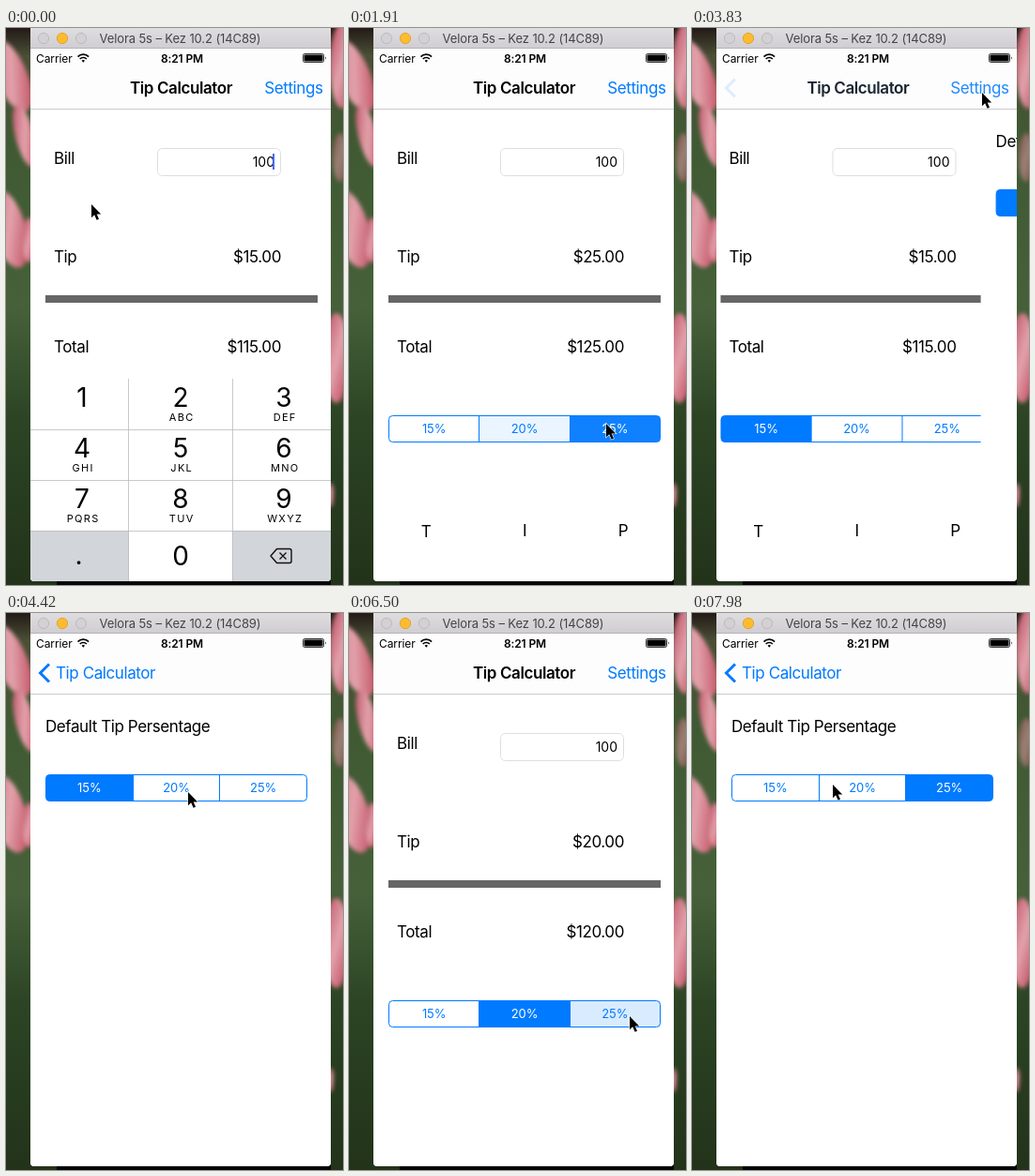
Write an HTML page that moves like this. It is 359 px wide and 594 px high and loops after 8000 ms.

```html
<!DOCTYPE html>
<html lang="en">
<head>
<meta charset="utf-8">
<title>Tip Calculator</title>
<style>
html, body { margin: 0; width: 100%; height: 100%; overflow: hidden; background: #26391f; }
svg { display: block; width: 359px; height: 594px; }
text { font: 17px Inter, "Liberation Sans", sans-serif; letter-spacing: -.41px; white-space: pre; }
.bold { font-weight: 600; }
.blue { fill: #007aff; }
.mid { text-anchor: middle; }
.end { text-anchor: end; }
.status { font-size: 12px; letter-spacing: -.1px; }
.seg text { font-size: 13px; letter-spacing: -.08px; text-anchor: middle; }
.digit { font-size: 28px; letter-spacing: 0; text-anchor: middle; }
.letters { font-size: 11px; letter-spacing: 1.3px; text-anchor: middle; }
</style>
</head>
<body>
<svg viewBox="0 0 359 594" xmlns="http://www.w3.org/2000/svg">
  <defs>
    <linearGradient id="leaves" x2="0" y2="1">
      <stop offset="0" stop-color="#241a17"/><stop offset=".05" stop-color="#4a4f36"/>
      <stop offset=".2" stop-color="#3f5a33"/><stop offset=".5" stop-color="#46613a"/>
      <stop offset=".7" stop-color="#2c4424"/><stop offset="1" stop-color="#22331a"/>
    </linearGradient>
    <linearGradient id="petal" x2="1" y2="1">
      <stop offset="0" stop-color="#b8475c"/><stop offset=".5" stop-color="#e3a3ac"/>
      <stop offset="1" stop-color="#b93a50"/>
    </linearGradient>
    <linearGradient id="chrome" x2="0" y2="1">
      <stop offset="0" stop-color="#dfdde0"/><stop offset="1" stop-color="#cfcdd1"/>
    </linearGradient>
    <filter id="soft" x="-30%" y="-30%" width="160%" height="160%"><feGaussianBlur stdDeviation="2"/></filter>
    <clipPath id="screen"><path d="M26 22H346V586a4 4 0 0 1-4 4H30a4 4 0 0 1-4-4Z"/></clipPath>
    <clipPath id="body"><path d="M26 87H346V586a4 4 0 0 1-4 4H30a4 4 0 0 1-4-4Z"/></clipPath>
  </defs>

  <rect width="359" height="594" fill="url(#leaves)"/>
  <g filter="url(#soft)" fill="url(#petal)">
    <ellipse cx="5" cy="50" rx="17" ry="42" transform="rotate(-24 5 50)"/>
    <ellipse cx="20" cy="115" rx="10" ry="34" transform="rotate(-14 20 115)"/>
    <ellipse cx="3" cy="214" rx="18" ry="43" transform="rotate(-16 3 214)"/>
    <ellipse cx="25" cy="226" rx="7" ry="24"/>
    <ellipse cx="358" cy="40" rx="13" ry="46"/>
    <ellipse cx="356" cy="138" rx="8" ry="26" opacity=".55"/>
    <ellipse cx="352" cy="352" rx="14" ry="48"/>
    <ellipse cx="346" cy="498" rx="3" ry="13"/>
  </g>
  <rect x="54" y="588" width="292" height="6" fill="#050505"/>

  <path d="M26 0H346V22H26Z" fill="url(#chrome)"/>
  <path d="M26 21.5H346" stroke="#b5b3b6"/>
  <g fill="#d3d1d4" stroke="#bcbabd">
    <circle cx="40" cy="11" r="5.6"/>
    <circle cx="60" cy="11" r="5.6" fill="#fdbc2f" stroke="#e3a32a"/>
    <circle cx="80" cy="11" r="5.6"/>
  </g>
  <text class="mid" x="185.5" y="16" fill="#444" style="font-size:13px;letter-spacing:-.1px">Velora 5s – Kez 10.2 (14C89)</text>

  <g clip-path="url(#screen)">
    <rect x="26" y="22" width="320" height="568" fill="#fff"/>
    <rect x="26" y="22" width="320" height="64" fill="#fdfdfd"/>
    <path d="M26 86.5H346" stroke="#cbcbcf"/>
    <text class="status" x="32" y="36.5">Carrier</text>
    <text class="status bold mid" x="187.5" y="36.5">8:21 PM</text>
    <g fill="none" stroke="#000" stroke-width="1.7">
      <path d="M76.5 30.6a8.2 8.2 0 0 1 11.6 0M78.7 33a5.1 5.1 0 0 1 7.2 0"/>
      <path d="M82.3 36.8l-1.7-2a2.4 2.4 0 0 1 3.4 0Z" fill="#000" stroke="none"/>
    </g>
    <rect x="316.5" y="27.5" width="22" height="9" rx="1.8" fill="#fff" stroke="#000" stroke-width=".8"/>
    <rect x="317.5" y="28.5" width="20" height="7" rx="1"/>
    <path d="M340 30.2q1.6 1.8 0 3.6Z"/>

    <text id="title" class="bold mid" y="70">Tip Calculator</text>
    <text id="settings" class="blue end" x="337.5" y="70">Settings</text>
    <g id="back">
      <path d="M46 54.5 36.5 64 46 73.5" fill="none" stroke="#007aff" stroke-width="3"/>
      <text id="backText" class="blue" y="70">Tip Calculator</text>
    </g>

    <g clip-path="url(#body)">
      <g id="main">
        <rect x="26" y="87" width="320" height="503" fill="#fff"/>
        <text x="51" y="145">Bill</text>
        <rect x="161.5" y="128.5" width="131" height="29" rx="5" fill="#fff" stroke="#dedede"/>
        <text class="end" x="286" y="148" style="font-size:14px;letter-spacing:0">100</text>
        <rect id="caret" x="284" y="134" width="2" height="17" fill="#4767ee"/>
        <text x="51" y="250">Tip</text>
        <text id="tip" class="end" x="293" y="250"></text>
        <rect x="42" y="285" width="290" height="8" fill="#666"/>
        <text x="51" y="346">Total</text>
        <text id="total" class="end" x="293" y="346"></text>
        <g id="mainSeg" class="seg"></g>
        <g id="labels" class="mid">
          <text x="82" y="543">T</text><text x="187" y="542">I</text><text x="292" y="542">P</text>
        </g>
        <g id="keys"></g>
      </g>
      <g id="prefs">
        <rect x="26" y="87" width="320" height="503" fill="#fff"/>
        <text x="42" y="127">Default Tip Persentage</text>
        <g id="prefSeg" class="seg"></g>
      </g>
    </g>
  </g>
  <path id="cursor" d="M0 0V14.2L3.2 11.3 5.6 16.8 8 15.8 5.700 10.400H10.200Z" fill="#000" stroke="#fff" stroke-width="1.2" paint-order="stroke"/>
</svg>
<script>
const LOOP = 8000, STEP = 147.6, LEAD = 12;
const RATES = [15, 20, 25], BLUE = '#007aff';
const $ = id => document.getElementById(id);

function add(parent, tag, attrs, content) {
  const el = document.createElementNS('http://www.w3.org/2000/svg', tag);
  for (const key in attrs) el.setAttribute(key, attrs[key]);
  if (content) el.textContent = content;
  return parent.appendChild(el);
}

// All tables start with the step number.
const path = [
  [0, 91, 188], [3, 91, 188], [4, 98, 225], [5, 125, 320], [6, 160, 415], [7, 167, 437],
  [8, 167, 437], [9, 178, 436], [10, 220, 431], [11, 260, 425], [12, 274, 422], [15, 274, 422],
  [16, 235, 422], [17, 180, 422], [18, 165, 422], [19, 98, 422], [20, 94, 421], [21, 98, 416],
  [22, 240, 180], [23, 322, 51], [24, 309, 69], [27, 309, 69], [28, 290, 95], [29, 235, 150],
  [30, 194, 191], [32, 191, 189], [33, 186, 183], [34, 172, 160], [35, 146, 120], [36, 120, 84],
  [37, 109, 70], [39, 109, 70], [40, 118, 82], [41, 170, 170], [42, 245, 320], [43, 295, 425],
  [44, 299, 430], [45, 299, 430], [46, 301, 420], [47, 310, 270], [48, 318, 130], [49, 322, 70],
  [51, 322, 70], [52, 290, 90], [53, 200, 150], [54, 150, 183]
];
const push = [
  [0, 0], [25, 0], [26, .12], [27, .7], [28, .95], [29, 1],
  [38, 1], [39, .85], [40, .28], [41, .05], [42, 0],
  [49, 0], [50, .12], [51, .7], [52, .95], [53, 1]
];
const keyboard = [[0, 0], [1, 28], [2, 150], [3, 216]];
const choices = [[0, 0], [8, 1], [13, 2], [18, 1], [21, 0], [32, 1], [45, 2]];

function at(table, step) {
  const i = table.findIndex(row => row[0] > step);
  if (i < 0) return table[table.length - 1].slice(1);
  const a = table[i - 1], b = table[i], f = (step - a[0]) / (b[0] - a[0]);
  return a.slice(1).map((v, j) => v + (b[j + 1] - v) * f);
}

function segments(group, x, y, width) {
  const w = width / 3, bottom = y + 28;
  const ends = [
    `M${x + w} ${y}V${bottom}H${x + 4}a4 4 0 0 1-4-4V${y + 4}a4 4 0 0 1 4-4Z`,
    `M${x + w} ${y}h${w}v28h${-w}Z`,
    `M${x + 2 * w} ${y}H${x + width - 4}a4 4 0 0 1 4 4v20a4 4 0 0 1-4 4H${x + 2 * w}Z`
  ];
  const fills = ends.map(d => add(group, 'path', { d, fill: BLUE }));
  add(group, 'rect', { x, y, width, height: 28, rx: 4, fill: 'none', stroke: BLUE });
  for (const n of [1, 2])
    add(group, 'path', { d: `M${Math.floor(x + n * w) + .5} ${y}v28`, stroke: BLUE });
  const texts = RATES.map((r, i) => add(group, 'text', { x: x + w * (i + .5), y: y + 18.6 }, r + '%'));
  return (alphas, selected) => alphas.forEach((alpha, i) => {
    fills[i].setAttribute('fill-opacity', alpha);
    texts[i].setAttribute('fill', i === selected ? '#fff' : BLUE);
  });
}

function buildKeys() {
  const g = $('keys'), centers = [81, 186, 296];
  const letters = ['', 'ABC', 'DEF', 'GHI', 'JKL', 'MNO', 'PQRS', 'TUV', 'WXYZ'];
  add(g, 'rect', { x: 26, y: 374, width: 320, height: 216, fill: '#fff' });
  for (const x of [26, 241])
    add(g, 'rect', { x, y: 536, width: 105, height: 54, fill: '#d2d5da' });
  add(g, 'path', { d: 'M26 428.500H346M26 482.500H346M26 536.500H346M130.500 374V590M241.500 374V590', stroke: '#b9bbbf', 'stroke-width': .8 });
  letters.forEach((word, i) => {
    const x = centers[i % 3], y = 404 + 54 * Math.floor(i / 3);
    add(g, 'text', { class: 'digit', x, y }, i + 1);
    add(g, 'text', { class: 'letters', x: x + 1.2, y: y + 15 }, word);
  });
  add(g, 'text', { class: 'digit', x: 186, y: 573 }, '0');
  add(g, 'text', { class: 'digit', x: 77.5, y: 572 }, '.');
  add(g, 'path', {
    d: 'M288.500 555.500H302a2 2 0 0 1 2 2v11a2 2 0 0 1-2 2H288.500L282 563ZM291.500 559.500l7 7m0-7l-7 7',
    fill: 'none', stroke: '#111', 'stroke-width': 1.4, 'stroke-linejoin': 'round'
  });
}

buildKeys();
const paintMain = segments($('mainSeg'), 42.5, 413.5, 289);
const paintPrefs = segments($('prefSeg'), 42.5, 172.5, 278);

function paintChoice(step) {
  const n = choices.filter(c => c[0] <= step).length - 1;
  const [since, selected] = choices[n], next = choices[n + 1];
  const alphas = [0, 0, 0];
  alphas[selected] = 1;
  if (n && step === since) {
    alphas[selected] = .94;
    alphas[choices[n - 1][1]] = .08;
  }
  if (next && step === next[0] - 1) alphas[next[1]] = .15;
  paintMain(alphas, selected);
  paintPrefs(alphas, selected);
  $('tip').textContent = `$${RATES[selected]}.00`;
  $('total').textContent = `$${100 + RATES[selected]}.00`;
}

function shift(id, x, y = 0) { $(id).setAttribute('transform', `translate(${x} ${y})`); }
function fade(id, opacity) { $(id).setAttribute('opacity', opacity); }

function draw(time) {
  const step = Math.floor((time % LOOP + LEAD) / STEP);
  const [p] = at(push, step), [drop] = at(keyboard, step), [x, y] = at(path, step);
  shift('cursor', x, y);
  shift('keys', 0, drop);
  shift('main', -96 * p);
  shift('prefs', 320 * (1 - p));
  $('title').setAttribute('x', 186.5 - 80 * p);
  $('backText').setAttribute('x', 53 + 80 * (1 - p));
  fade('title', 1 - p);
  fade('settings', (1 - p) * (step === 25 || step === 49 ? .9 : 1));
  fade('back', step === 38 ? .2 : p);
  fade('caret', step < 1 ? 1 : 0);
  fade('labels', step < 39 ? 1 : 0);
  paintChoice(step);
}

function tick() {
  draw(performance.now());
  requestAnimationFrame(tick);
}
tick();
</script>
</body>
</html>
```
